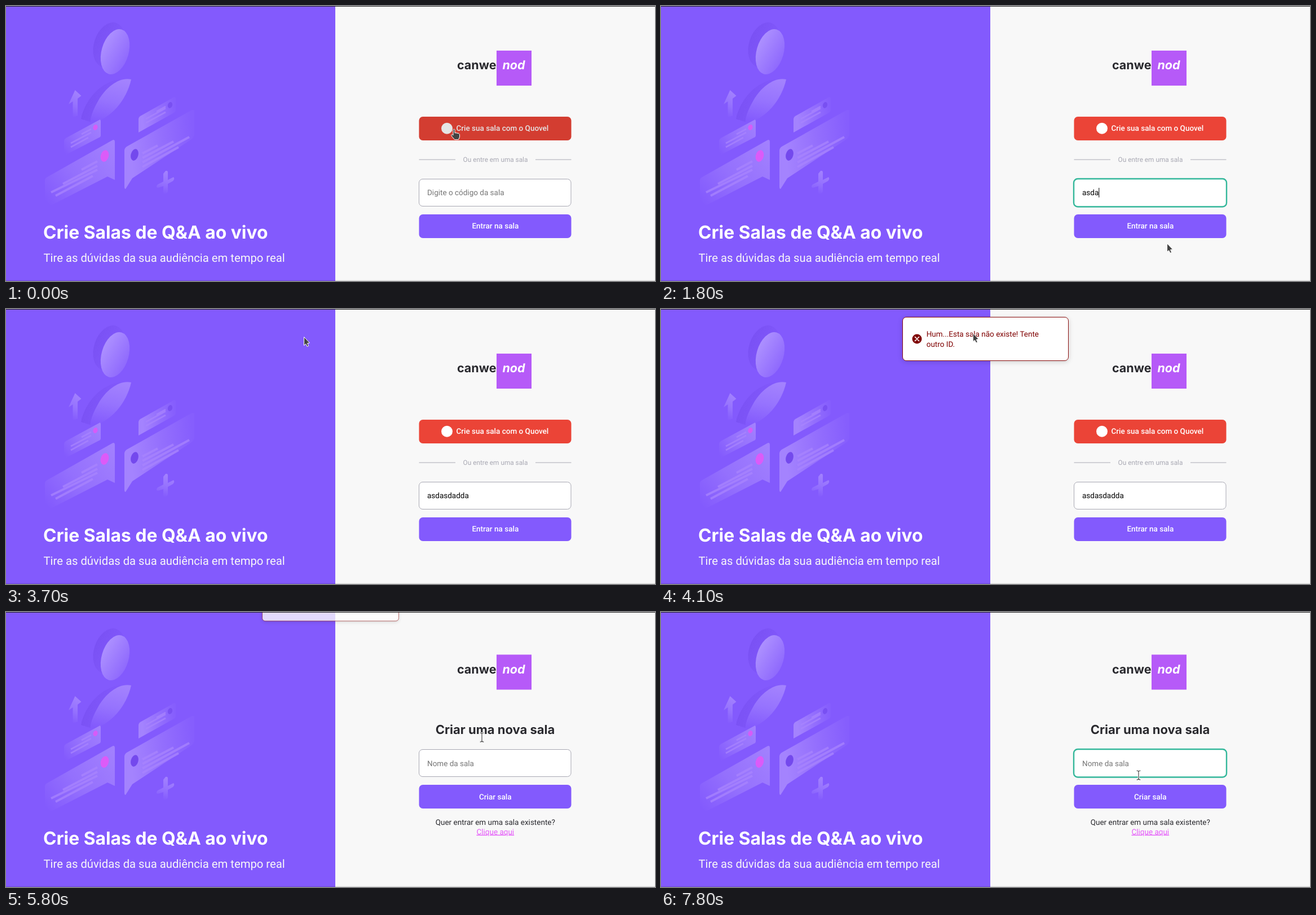
Animation of 1151 by 487 pixels, one loop 8 s. Source, as an HTML page:

```html
<!DOCTYPE html>
<html lang="pt-BR">
<head>
<meta charset="utf-8">
<title>Salas ao vivo</title>
<style>
html, body { margin: 0; width: 100%; height: 100%; overflow: hidden; background: #f8f8f8; }
svg { display: block; width: 100%; height: 100%; }
text { font: 400 13.5px Roboto, sans-serif; text-rendering: geometricPrecision; white-space: pre; }
.title { font: 700 31.8px Inter, sans-serif; fill: #fff; }
.sub { font-size: 20.25px; fill: #f8f8f8; }
.head { font: 700 22px Inter, sans-serif; fill: #29292e; }
.brand { font: 700 21.5px Inter, sans-serif; fill: #29292e; }
.btn { font-weight: 500; fill: #fff; }
.mid { text-anchor: middle; }
.small { font-size: 11.81px; fill: #a8a8b3; }
.hint { fill: #757575; }
.field { fill: #fff; stroke: #a8a8b3; }
.ring { fill: #fff; stroke: #33b79a; stroke-width: 2.4; }
.lines { stroke: #a884fe; stroke-opacity: .75; stroke-width: 4; }
.thin { stroke-width: 2.6; }
.toast { filter: drop-shadow(0 2px 4px rgba(0,0,0,.16)); }
.toast text { fill: #7f0000; }
.pointer { fill: #434343; stroke: #fff; stroke-width: 1; stroke-linejoin: round; }
</style>
</head>
<body>
<svg viewBox="0 0 1151 487" preserveAspectRatio="none">
  <defs>
    <linearGradient id="fade" x1=".6" y1="0" x2=".4" y2="1">
      <stop offset="0" stop-color="#a382fe"/><stop offset=".5" stop-color="#9673fe"/><stop offset="1" stop-color="#835afd"/>
    </linearGradient>
    <linearGradient id="fadeLeft" x1="1" y1=".1" x2="0" y2=".9">
      <stop offset="0" stop-color="#a280fe"/><stop offset=".55" stop-color="#9470fd"/><stop offset="1" stop-color="#835afd"/>
    </linearGradient>
    <linearGradient id="fadeRight" x1=".1" y1=".6" x2="1" y2=".5">
      <stop offset="0" stop-color="#a483fe"/><stop offset=".5" stop-color="#946ffd"/><stop offset="1" stop-color="#865efd"/>
    </linearGradient>
    <linearGradient id="face" x1=".1" y1=".3" x2="1" y2=".7">
      <stop offset="0" stop-color="#ab8eff"/><stop offset="1" stop-color="#8e68fd"/>
    </linearGradient>
    <linearGradient id="shade" x1="0" y1=".4" x2="1" y2=".6">
      <stop offset="0" stop-color="#7a51f4"/><stop offset="1" stop-color="#835afd"/>
    </linearGradient>
  </defs>

  <rect width="1151" height="487" fill="#f8f8f8"/>
  <rect width="584" height="487" fill="#835afd"/>

  <!-- illustration -->
  <ellipse cx="183" cy="69" rx="27" ry="41" transform="rotate(18 183 69)" fill="url(#shade)"/>
  <ellipse cx="193.5" cy="81" rx="24" ry="41" transform="rotate(16 193.5 81)" fill="url(#face)"/>
  <path d="M205 129C170 132 140 165 133 200L152 206C153 180 180 140 205 129Z" fill="url(#shade)"/>
  <path d="M222 130C203 125 178 142 164 167C154 184 149 198 150 208C186 201 214 166 222 130Z" fill="url(#fade)"/>
  <path d="M122.500 149L133.500 159L127 164V194L118.500 198V169L111 174Z" fill="url(#fade)"/>
  <path d="M283 292Q287 291 287 295V308L297 303Q300 306 296 310L287 315V329Q284 334 279 333V319L269 322Q265 320 269 316L279 311V297Z" fill="url(#fade)"/>

  <path d="M103 239Q103 236 106 234L165 202Q168 200 168 204V229Q168 232 165 233L103 265Z" fill="url(#fadeLeft)"/>
  <path class="lines thin" d="M134 227L151 218M115 243L151 224M115 250L146 233"/>
  <ellipse cx="158.500" cy="215" rx="4" ry="5" transform="rotate(20 158.500 215)" fill="#d65cf8"/>

  <path d="M69 309Q69 305 73 303L188 238Q193 235 193 241V308L180 302L76 355Q69 358 69 352Z" fill="url(#fadeLeft)"/>
  <path class="lines" d="M134 290L162 275M101 315L162 283M80 330L162 290M88 336L154 301"/>
  <ellipse cx="175" cy="265.500" rx="7" ry="10.500" transform="rotate(15 175 265.500)" fill="#dc5bf8"/>

  <path d="M235 200Q235 197 238 195L297 162Q301 160 301 164V183Q301 187 298 189L235 224Z" fill="url(#fadeRight)"/>
  <path class="lines thin" d="M248 200L283 181M248 207L283 188M267 187L283 178"/>
  <ellipse cx="291" cy="175.500" rx="4" ry="5.500" transform="rotate(18 291 175.500)" fill="#7950f2"/>

  <path d="M210 256Q210 252 214 249L328 185Q334 182 334 188V226Q334 232 329 236L224 305L212 324Q210 324 210 320Z" fill="url(#fadeRight)"/>
  <path class="lines" d="M242 261L269 247M242 269L297 240M242 277L325 232M242 285L306 250"/>
  <ellipse cx="228" cy="263.500" rx="6.500" ry="10.500" transform="rotate(15 228 263.500)" fill="#7449ed"/>

  <text class="title" x="66" y="412">Crie Salas de Q&amp;A ao vivo</text>
  <text class="sub" x="66.500" y="453.300">Tire as dúvidas da sua audiência em tempo real</text>

  <g id="logo">
    <rect x="870" y="79" width="62" height="62" fill="#b65af8"/>
    <text class="brand" x="800" y="112">canwe</text>
    <text class="brand mid" x="900.500" y="112" style="fill:#fff;font-style:italic">nod</text>
  </g>

  <g id="home">
    <rect x="732.500" y="196" width="270" height="42" rx="6.750" fill="#eb4437"/>
    <circle cx="782" cy="216.700" r="10" fill="#fff"/>
    <text class="btn" x="798.500" y="221.300">Crie sua sala com o Quovel</text>
    <rect id="redDim" x="732.500" y="196" width="270" height="42" rx="6.750"/>
    <path d="M732.500 272H797M939 272H1002.500" stroke="#a8a8b3"/>
    <text class="small mid" x="868" y="276">Ou entre em uma sala</text>
    <rect class="field" x="732.500" y="306.500" width="269.500" height="48" rx="6.500"/>
    <rect id="codeRing" class="ring" x="732" y="306" width="271" height="49.500" rx="7"/>
    <text id="codeHint" class="hint" x="747" y="335.200">Digite o código da sala</text>
    <text id="code" x="747" y="335.200"></text>
    <rect id="codeCaret" y="322" width="1" height="17"/>
    <rect x="732.500" y="369" width="270" height="42" rx="6.750" fill="#835afd"/>
    <text class="btn mid" x="867.800" y="394.300">Entrar na sala</text>
    <rect id="violetDim" x="732.500" y="369" width="270" height="42" rx="6.750"/>
  </g>

  <g id="create">
    <text class="head mid" x="867.500" y="215.500">Criar uma nova sala</text>
    <rect class="field" x="732.500" y="243.500" width="269.500" height="48" rx="6.500"/>
    <rect id="nameRing" class="ring" x="732" y="243" width="271" height="49.500" rx="7"/>
    <text class="hint" x="747" y="272.500">Nome da sala</text>
    <rect id="nameCaret" x="747" y="260" width="1" height="16"/>
    <rect x="732.500" y="306" width="270" height="42" rx="6.750" fill="#835afd"/>
    <text class="btn mid" x="867.800" y="331.500">Criar sala</text>
    <text class="mid" x="867.800" y="377.300" fill="#29292e">Quer entrar em uma sala existente?</text>
    <text class="mid" x="867.800" y="393.500" fill="#e559f9" text-decoration="underline">Clique aqui</text>
  </g>

  <g id="toast" class="toast">
    <rect x="428.500" y="14.500" width="294" height="77" rx="6.500" fill="#fff" stroke="#8b0f0f"/>
    <g id="badge"><circle r="8.500" fill="#7f0000"/></g>
    <g id="cross"><path d="M-3.500 -3.500L3.500 3.500M3.500 -3.500L-3.500 3.500" stroke="#fff" stroke-width="1.700" stroke-linecap="round"/></g>
    <text x="470.700" y="49.200">Hum...Esta sala não existe! Tente</text>
    <text x="470.700" y="66.800">outro ID.</text>
  </g>

  <g id="arrow" class="pointer"><path d="M.5 .5V15.500L3.700 12.800L6 17.500L8.600 16.400L6.500 11.700L10.500 11Z"/></g>
  <g id="hand" class="pointer"><path d="M-1 1.500C-1 -.3 2 -.3 2 1.500V7L4 6.500L6 7.300L8 7.300L9.500 8.500Q11 9 10.500 11V14L8.500 18.500H1.500L-4 12C-5 10 -3 9 -1.500 10.500L-1 11Z"/></g>
  <g id="beam" fill="none" stroke-linecap="round">
    <path id="beamShape" d="M-3 -8Q0 -8 0 -6Q0 -8 3 -8M0 -6V6M-3 8Q0 8 0 6Q0 8 3 8" stroke="#fff" stroke-width="2.600"/>
    <use href="#beamShape" style="stroke:#333"/>
    <path d="M-3 -8Q0 -8 0 -6Q0 -8 3 -8M0 -6V6M-3 8Q0 8 0 6Q0 8 3 8" stroke="#3a3a3a" stroke-width="1.100"/>
  </g>

  <rect width="1151" height="1" fill="#222"/>
  <rect y="485" width="1151" height="1" opacity=".04"/>
  <rect y="486" width="1151" height="1" opacity=".13"/>
</svg>
<script>
const LOOP = 8000;
const el = Object.fromEntries([...document.querySelectorAll('[id]')].map(e => [e.id, e]));

// spans in which the screen refreshes every 100 ms; it rests in between
const spans = [[0, 0], [400, 900], [1100, 2400], [2600, 2600], [3100, 3400], [3600, 3800],
  [4000, 4300], [5000, 5000], [5200, 5300], [5500, 5600], [5800, 5800], [6000, 6000],
  [6200, 6400], [7100, 7100], [7500, 7500], [7700, 7800]];

// time, pointer, x, y
const path = [
  [0, 'hand', 794, 218], [400, 'hand', 797, 221], [500, 'arrow', 808, 250],
  [600, 'beam', 822, 318], [700, 'beam', 832, 350], [900, 'beam', 836, 342],
  [1100, 'arrow', 640, 262], [1300, 'arrow', 2, 134], [1500, 'arrow', 380, 350],
  [1700, 'arrow', 952, 425], [1800, 'arrow', 897, 420], [2000, 'arrow', 890, 424],
  [2200, 'hand', 860, 400], [2400, 'hand', 838, 375], [3100, 'hand', 825, 371],
  [3200, 'beam', 775, 320], [3300, 'arrow', 690, 240], [3400, 'arrow', 586, 159],
  [3700, 'arrow', 528, 49], [3800, 'arrow', 530, 46], [4300, 'arrow', 568, 40],
  [5000, 'arrow', 775, 245], [5200, 'arrow', 786, 259], [5300, 'hand', 851, 211],
  [5600, 'hand', 851, 211], [5800, 'beam', 844, 222], [6000, 'beam', 826, 249],
  [6200, 'beam', 800, 265], [6400, 'beam', 789, 268], [7100, 'beam', 795, 269],
  [7500, 'beam', 807, 275], [7700, 'beam', 832, 284], [7800, 'beam', 847, 289]];

const typed = 'asdasdadda';
const keyTimes = [1500, 1600, 1700, 1800, 1900, 2000, 2100, 2200, 2300, 2600];

const clamp = v => Math.min(1, Math.max(0, v));
const ramp = (t, start, length) => clamp((t - start) / length);
const show = (e, on) => e.style.display = on ? '' : 'none';

function bezier(x1, y1, x2, y2) {
  const at = (a, b, s) => 3 * a * (1 - s) ** 2 * s + 3 * b * (1 - s) * s * s + s ** 3;
  return x => {
    if (x <= 0 || x >= 1) return clamp(x);
    let lo = 0, hi = 1;
    for (let i = 0; i < 24; i++) {
      const m = (lo + hi) / 2;
      if (at(x1, x2, m) < x) lo = m; else hi = m;
    }
    return at(y1, y2, lo);
  };
}
const enter = bezier(.21, 1.02, .73, 1);
const leave = bezier(.06, .71, .55, 1);
const pop = bezier(.175, .885, .32, 1.275);
const easeOut = bezier(0, 0, .58, 1);

function snap(t) {
  const [a, b] = spans.findLast(s => s[0] <= t);
  return Math.min(b, a + Math.floor((t - a) / 100) * 100);
}

function drawPointer(t) {
  const i = path.findLastIndex(p => p[0] <= t);
  const p = path[i], q = path[i + 1] || p;
  const k = q === p ? 0 : (t - p[0]) / (q[0] - p[0]);
  const x = p[2] + (q[2] - p[2]) * k, y = p[3] + (q[3] - p[3]) * k;
  for (const kind of ['arrow', 'hand', 'beam']) show(el[kind], kind === p[1]);
  el[p[1]].setAttribute('transform', `translate(${x} ${y})`);
}

function drawToast(t) {
  const start = t < 5733 ? 3691 : 5733;
  const age = t - start;
  show(el.toast, age >= 0);
  if (age < 0) return;
  const out = leave(ramp(t, 7650, 400));
  const away = t < 7650 ? 1 - enter(clamp(age / 350)) : out;
  const dy = -78 * away * (t < 7650 ? 2 : 1.5);
  const scale = 1 - .4 * away;
  el.toast.setAttribute('transform', `translate(575.5 ${53 + dy}) scale(${scale}) translate(-575.5 -53)`);
  el.toast.setAttribute('opacity', t < 7650 ? 1 - away / 2 : 1 - out);
  const size = pop(ramp(age, 100, 300));
  el.badge.setAttribute('transform', `translate(454 53) scale(${size})`);
  el.cross.setAttribute('transform', `translate(454 53) scale(${easeOut(ramp(age, 150, 165))})`);
}

function drawPage(t) {
  const home = t < 5800;
  show(el.home, home);
  show(el.create, !home);
  el.logo.setAttribute('transform', `translate(0 ${home ? 0 : -3.5})`);
  if (home) {
    const red = 1 - ramp(t, 400, 200) + ramp(t, 5230, 220);
    const violet = ramp(t, 2150, 200) - ramp(t, 3100, 200);
    el.redDim.setAttribute('opacity', red * .1);
    el.violetDim.setAttribute('opacity', violet * .1);
    const text = typed.slice(0, keyTimes.filter(k => k <= t).length);
    const focus = t >= 800 && t < 3100;
    el.code.textContent = text;
    show(el.codeHint, !text);
    show(el.codeRing, focus);
    show(el.codeCaret, focus);
    el.codeCaret.setAttribute('x', 747 + (text ? el.code.getComputedTextLength() : 0));
  } else {
    show(el.nameRing, t >= 6300);
    show(el.nameCaret, t >= 6300 && t < 7700);
  }
}

function frame(now) {
  const t = snap(now % LOOP);
  drawPage(t);
  drawToast(t);
  drawPointer(t);
  requestAnimationFrame(() => frame(performance.now() - origin));
}
const origin = performance.now();
frame(0);
</script>
</body>
</html>
```
